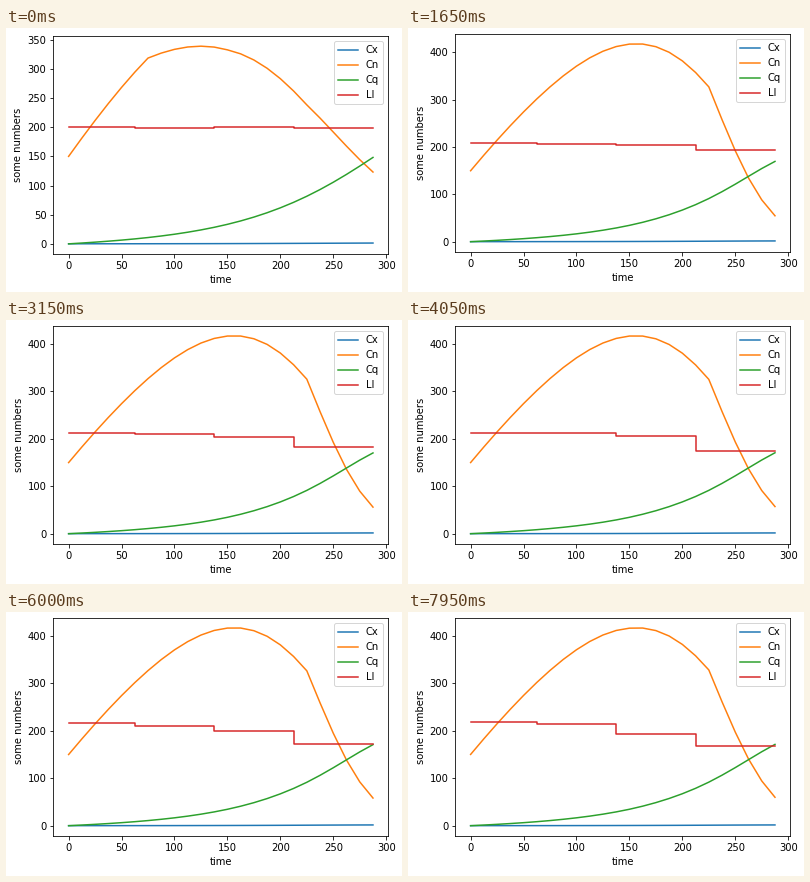
Recreate the animation shown at these times as a matplotlib script. Size 396 by 264 pixels, loop 8 s.

```python
import numpy as np
import matplotlib.pyplot as plt
from matplotlib.animation import FuncAnimation

W, H, DPI = 396, 264, 72
AX_LEFT, AX_TOP, AX_W, AX_H = 47.4, 6.15, 334.8, 217.44
LABEL_RISE = 5.6
FRAME_MS, LOOP_MS, STEP_MS = 50, 8000, 150
DT, POINTS, SUBSTEPS = 12.5, 24, 5
TIME = DT * np.arange(POINTS)

# Light level in four stages, at chosen optimiser steps
KEY_STEPS = [0, 6, 16, 27, 35, 45, 53]
LIGHT = np.array([
    [201, 199.5, 201, 198],
    [206, 204, 204, 198],
    [211.5, 209.5, 203, 188],
    [211.5, 211.5, 205, 175],
    [216, 209.5, 203, 175],
    [217.5, 211, 198, 169],
    [219, 214.5, 193.5, 168],
])
FEED_START = np.array([2.87, 1.77, 1.88, 2.13])
FEED_END = np.array([3.0, 3.0, 3.0, 0.0])


def rates(state, light, feed):
    """Growth of biomass x (slowed by its own shade), nitrate n, product q."""
    x, n, q = state
    growth = (0.0549 * light / (light + 178.9 + light**2 / 447.1)
              * x / (1 + 0.035 * x) * n / (n + 393.1))
    product = 1.48 * light / (light + 23.51 + light**2 / 800) * x
    return np.array([growth, feed - 504.5 * growth,
                     product - 0.281 * q / (n + 16.89)])


def simulate(light, feed):
    state = np.array([0.1, 150.0, 0.0])
    path = [state]
    h = DT / SUBSTEPS
    for k in range(POINTS - 1):
        u = light[k // 6], feed[k // 6]
        for _ in range(SUBSTEPS):
            a = rates(state, *u)
            b = rates(state + h / 2 * a, *u)
            c = rates(state + h / 2 * b, *u)
            d = rates(state + h * c, *u)
            state = state + h / 6 * (a + 2 * b + 2 * c + d)
        path.append(state)
    return np.array(path).T


def controls(step):
    light = np.array([np.interp(step, KEY_STEPS, stage) for stage in LIGHT.T])
    feed = FEED_END + (FEED_START - FEED_END) * 0.3**step
    return light, feed


fig = plt.figure(figsize=(W / DPI, H / DPI), dpi=DPI, facecolor="white")
ax = fig.add_axes([0, 0, 1, 1])
lines = [ax.plot([], [], label=name)[0] for name in ("Cx", "Cn", "Cq")]
lines += ax.plot([], [], drawstyle="steps-pre", label="LI")
ax.set_xlabel("time")
ax.set_ylabel("some numbers")
ax.legend(loc="upper right")


def place_axes(top):
    ax.set_position([AX_LEFT / W, 1 - (top + AX_H) / H, AX_W / W, AX_H / H])


def label_overhang():
    """Height by which the top tick label sticks out above the frame."""
    low, high = ax.get_ylim()
    top_tick = max(t for t in ax.get_yticks() if t <= high)
    gap = (high - top_tick) / (high - low) * AX_H
    return max(0, LABEL_RISE - gap)


def update(frame):
    light, feed = controls(frame * FRAME_MS // STEP_MS)
    curves = [*simulate(light, feed), np.repeat(light, 6)]
    for line, values in zip(lines, curves):
        line.set_data(TIME, values)
    ax.relim()
    ax.autoscale_view()
    place_axes(AX_TOP + label_overhang())
    return lines


place_axes(AX_TOP)
anim = FuncAnimation(fig, update, frames=LOOP_MS // FRAME_MS,
                     interval=FRAME_MS, repeat=True, repeat_delay=0)
plt.show()
```
